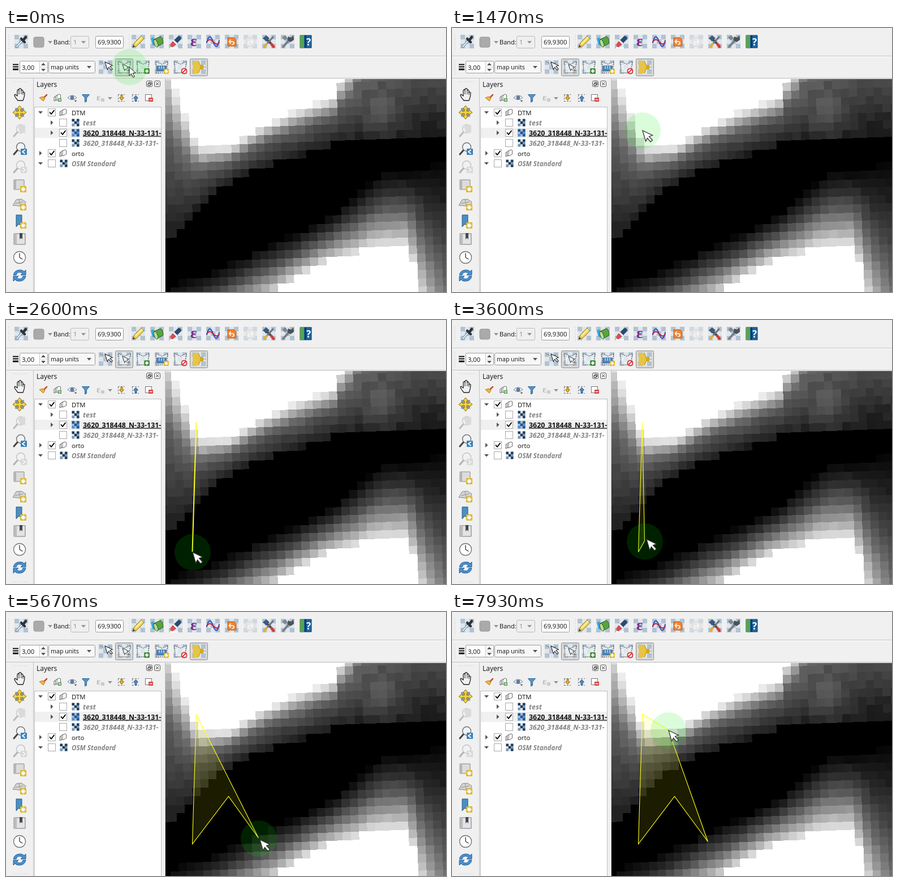
Animation, 778 px wide and 466 px high, one loop 8000 ms. Source, as an HTML page with a canvas:

```html
<!DOCTYPE html>
<html lang="en">
<head>
<meta charset="utf-8">
<title>Polygon selection on a raster layer</title>
<style>
  html, body { margin: 0; width: 100%; height: 100%; overflow: hidden; background: #f0f0f0; }
  canvas { position: absolute; left: 282px; top: 90px; }
  svg { position: absolute; left: 0; top: 0; }
  text { font: 11.3px "Open Sans", sans-serif; fill: #111; white-space: pre; }
  .layer { font: italic 700 12.4px "Open Sans", sans-serif; fill: #858585; }
  .field { fill: #fff; stroke: #9b9b9b; }
  .btn { fill: #d9d9d9; stroke: #8c8c8c; }
  .ln { fill: none; stroke-linecap: round; stroke-linejoin: round; }
</style>
</head>
<body>
<canvas id="map" width="496" height="376"></canvas>
<svg width="778" height="466" viewBox="0 0 778 466">
  <defs>
    <g id="chk">
      <rect x="-12" y="-12" width="24" height="24" fill="#dfe6ed"/>
      <path fill="#b1c2d2" d="M-12-12h8v8h-8zM4-12h8v8h-8zM-4-4h8v8h-8zM-12 4h8v8h-8zM4 4h8v8h-8z"/>
    </g>
    <g id="ras">
      <rect x="-6.5" y="-6.5" width="13" height="13" fill="#d5dfe8"/>
      <path fill="#1f3a57" d="M-6.500-6.500h4.400v4.400h-4.400zM2.100-6.500h4.400v4.400h-4.400zM-2.200-2.200h4.400v4.400h-4.400zM2.100 2.100h4.400v4.400h-4.400z"/>
      <path fill="#7795b2" d="M-6.500 2.100h4.400v4.400h-4.400zM2.100-2.200h4.400v4.400h-4.400z"/>
    </g>
    <g id="stack" fill="#fff" stroke="#666">
      <path d="M-6-1l4-2v7l-4 2z"/><path d="M-3.500-3l4-2v8l-4 2z"/><path d="M-1-4l4-2 2.500 1v7l-6.500 3z"/>
    </g>
    <g id="box"><rect x="-6.5" y="-6.5" width="13" height="13" fill="#fff" stroke="#a9a9a9"/></g>
    <g id="tick"><use href="#box"/><path class="ln" d="M-3.500 0L-1 3 4-3.500" stroke="#000" stroke-width="1.900"/></g>
    <path id="down" d="M-4-2h8l-4 4.500z" fill="#555"/>
    <path id="right" d="M-2-4v8l4.500-4z" fill="#555"/>
    <path id="poly" d="M-10-10L1-5 11-10 8 10H-9z" fill="#eef1f4" fill-opacity=".75" stroke="#333" stroke-dasharray="2 1.500"/>
    <path id="arrow" d="M0 0v15l3.500-3.500 3 6.500 2.800-1.200-3-6.300h5z" fill="#fff" stroke="#111"/>
    <g id="star"><rect x="-5" y="-5" width="11" height="11" rx="1.500" fill="#d9b526"/>
      <path d="M.5-4v9M-4 .5h9M-2.500-2.500l6 6M3.500-2.500l-6 6" stroke="#fff" stroke-width="1.300"/></g>
    <g id="lens"><circle cx="2" cy="-3" r="7.500" fill="#eef3f7" stroke="#777" stroke-width="1.500"/>
      <path class="ln" d="M-4 3l-6 7" stroke="#444" stroke-width="3"/></g>
    <path id="grip" d="M1 0v26" stroke="#b5b5b5" stroke-dasharray="1 3"/>
    <clipPath id="tree"><rect x="51" y="140" width="223" height="326"/></clipPath>
    <clipPath id="view"><rect x="282" y="90" width="496" height="376"/></clipPath>
  </defs>

  <!-- frame lines -->
  <path fill="none" stroke="#c3c3c3" d="M0 49.500H778M0 88.500H778M48.500 89V466M281.500 89V466"/>
  <path fill="none" stroke="#fff" d="M0 50.500H778"/>
  <use href="#grip" x="4" y="12"/><use href="#grip" x="217" y="12"/><use href="#grip" x="4" y="57"/>
  <use href="#grip" transform="translate(38 94) rotate(90)"/><use href="#grip" transform="translate(38 461) rotate(90)"/>

  <!-- raster toolbar -->
  <g transform="translate(27 24)"><use href="#chk"/>
    <path class="ln" d="M-8 9L2-2" stroke="#5f7f99" stroke-width="4"/><path class="ln" d="M-8 9L2-2" stroke="#e8f4fb" stroke-width="2"/>
    <path class="ln" d="M0-5L6 1M4-3L8-8" stroke="#2d3339" stroke-width="4.500"/></g>
  <rect x="49" y="16" width="18" height="18" rx="3" fill="#aaa" stroke="#989898"/>
  <use href="#down" x="78" y="25" opacity=".6"/>
  <text x="84" y="29" style="font-size:11px">Band:</text>
  <rect x="114.500" y="14.500" width="32" height="21" rx="2" fill="#efefef" stroke="#bbb"/>
  <text x="119" y="29" style="fill:#888">1</text><use href="#down" x="137" y="25" opacity=".6"/>
  <rect class="field" x="158.500" y="14.500" width="49" height="21" rx="2"/><text x="162" y="29">69,9300</text>
  <g transform="translate(234 24)"><use href="#chk"/>
    <path d="M-10 10l3-8L5-10l5 5L-3 8z" fill="#f4d44c" stroke="#8f7420"/><path d="M-10 10l1.500-4 2.500 2.500z" fill="#333"/><path d="M-5 4L7-8" stroke="#fff3a8" stroke-width="2"/></g>
  <g transform="translate(267 24)"><use href="#chk"/>
    <path d="M-11-5l5-3 3 15-5-1z" fill="#38a4d8"/><path d="M-5-4l11-5q5 2 5 12L0 9z" fill="#5aa33c" stroke="#24571c"/>
    <ellipse cx="-3" cy="2" rx="3" ry="7" transform="rotate(-22)" fill="#b8dc9b" stroke="#24571c"/></g>
  <g transform="translate(300 24)"><use href="#chk"/>
    <path class="ln" d="M-4 4L6-6" stroke="#2b4a73" stroke-width="7.500"/><path class="ln" d="M-6 6l2-2" stroke="#e5484a" stroke-width="7"/>
    <path d="M-4-2l6 6" stroke="#fff" stroke-width="3"/><path d="M-10 11H4" stroke="#fff" stroke-width="2"/></g>
  <g transform="translate(333 24)"><use href="#chk"/>
    <text x="-7" y="8" style="font:bold 27px 'Liberation Serif',serif;fill:#7b2a86">ε</text></g>
  <g transform="translate(366 24)"><use href="#chk"/>
    <path class="ln" d="M-11 2C-8-12-4-11 0 0S8 12 11-2" stroke="#2a45c8" stroke-width="2"/><path class="ln" d="M-11 0C-6-5-4-4 0 0S6 6 11 2" stroke="#d51f26" stroke-width="2"/></g>
  <g transform="translate(399 24)"><use href="#chk"/>
    <path d="M-7-7H4l4 4V8H-7z" fill="#ee8434" stroke="#b8591b"/><path class="ln" d="M-4 0h5q3 0 3 2.500T1 5M-2-3l-2.500 3L-2 3" stroke="#fff" stroke-width="1.700"/></g>
  <g transform="translate(432 24)" opacity=".5"><use href="#chk"/>
    <path d="M-7-7H4l4 4V8H-7z" fill="#ddd" stroke="#bbb"/><path class="ln" d="M4 0h-5q-3 0-3 2.500T-1 5M2-3l2.500 3L2 3" stroke="#fff" stroke-width="1.700"/></g>
  <g transform="translate(465 24)"><use href="#chk"/>
    <path class="ln" d="M-6-6L3 3" stroke="#353c43" stroke-width="3.500"/><path class="ln" d="M4 4l4 5" stroke="#d53a32" stroke-width="4.500"/><path d="M-11-6l6-5 6 5-6 6z" fill="#3b5a80"/>
    <path class="ln" d="M7-8L-3 3" stroke="#6c757d" stroke-width="3"/><path class="ln" d="M-4 4l-4 5" stroke="#e0b02e" stroke-width="4"/></g>
  <g transform="translate(498 24)"><use href="#chk"/>
    <path class="ln" d="M-8 9L4-4" stroke="#777f87" stroke-width="4"/><path d="M1-9l5 2 4-4 1 8-6 4-6-4z" fill="#4b535a"/>
    <path d="M-10-8l6-3 4 5-5 4z" fill="#7d878f"/></g>
  <g transform="translate(531 24)">
    <path d="M-11-11H9v22h-20z" fill="#1b66a3" stroke="#173d5f"/><path d="M-11-11h7v22h-7z" fill="#55a452"/><path d="M-3-11h3v22h-3z" fill="#123a5c"/>
    <text x="0" y="7" style="font:bold 17px 'Open Sans',sans-serif;fill:#fff">?</text></g>

  <!-- selection toolbar -->
  <path d="M12 64.500h10M12 68.500h10" stroke="#111" stroke-width="2"/><path d="M12 73h10" stroke="#111" stroke-width="3"/>
  <rect class="field" x="24.500" y="58.500" width="49" height="21" rx="2"/><path d="M59.500 59v20M60 69h13" stroke="#c8c8c8"/>
  <use href="#down" x="66" y="74"/><use href="#down" transform="translate(66 64) scale(1 -1)"/><text x="28" y="73.500">3,00</text>
  <rect x="75.500" y="58.500" width="82" height="21" rx="2" fill="#f7f7f7" stroke="#9b9b9b"/><text x="79" y="73" style="font-size:10.700px">map units</text><use href="#down" x="147" y="69"/>
  <g transform="translate(176 69)"><use href="#chk"/><path class="ln" d="M-9-9L2-4 9-9" stroke="#444" stroke-dasharray="1 2.500"/><use href="#arrow" transform="translate(-1 -9) rotate(-18) scale(.95)"/></g>
  <rect class="btn" x="193.500" y="54.500" width="31" height="30" rx="2"/>
  <g transform="translate(209 69)"><use href="#chk"/><use href="#poly"/><use href="#arrow" transform="translate(-3 -5) rotate(-18) scale(.8)"/></g>
  <g transform="translate(242 69)"><use href="#chk"/><use href="#poly"/><rect x="2" y="2" width="10" height="10" rx="2" fill="#4d9448"/><path d="M7 4v6M4 7h6" stroke="#fff" stroke-width="2"/></g>
  <g transform="translate(275 69)"><use href="#chk"/><use href="#poly"/><rect x="-8" y="-2" width="16" height="9" fill="#4c88c1" stroke="#275987"/><path d="M-4-2v5M0-2v5M4-2v5" stroke="#fff"/><use href="#star" transform="translate(8 7) scale(.8)"/></g>
  <g transform="translate(308 69)"><use href="#chk"/><use href="#poly"/><circle cx="7" cy="7" r="4.500" fill="#fff" stroke="#d8393b" stroke-width="2"/><path d="M4 10l6-6" stroke="#d8393b" stroke-width="2"/></g>
  <rect class="btn" x="325.500" y="54.500" width="31" height="30" rx="2"/>
  <g transform="translate(341 69)"><use href="#chk"/><path d="M-11-11H-1L4 0-1 11h-10z" fill="#e7c444"/><path class="ln" d="M-1-11L4 0-1 11M4 0h8" stroke="#9d7b16" stroke-dasharray="2 1.500"/><path d="M2-4h6v8h-6z" fill="#d5a91d"/></g>

  <!-- map navigation -->
  <g transform="translate(24 117)"><path class="ln" d="M-3 11C-9 4-10 1-8 0l4 3V-7q2-3 3 0v-2q2-3 4 0v2q2-2 3 1v3q3-2 3 1C9 4 8 6 6 11z" fill="#fff" stroke="#222" stroke-width="1.300"/><path d="M-1-7v7M3-7v7M6-4v5" stroke="#222"/></g>
  <g transform="translate(24 149)"><path d="M-8-8H8V8H-8z" fill="#88a8c8"/><path d="M0-12l5 6H2v4h4v-3l6 5-6 5V2H2v4h3l-5 6-5-6h3V2h-4v3l-6-5 6-5v3h4v-4h-3z" fill="#f5d13d" stroke="#8a6c12"/></g>
  <g transform="translate(24 181)" opacity=".3"><use href="#lens"/><path d="M-4-10h14v14h-9z" fill="#aaa"/></g>
  <g transform="translate(24 213)"><use href="#lens"/><rect x="2" y="0" width="11" height="11" rx="1" fill="#3d83bc"/><path class="ln" d="M9 2.500L5 5.500l4 3" stroke="#fff" stroke-width="2"/></g>
  <g transform="translate(24 245)" opacity=".35"><use href="#lens"/><rect x="2" y="0" width="11" height="11" rx="1" fill="#aaa"/><path class="ln" d="M6 2.500l4 3-4 3" stroke="#fff" stroke-width="2"/></g>
  <g transform="translate(24 277)"><path d="M-10-9H8V8h-18z" fill="#dcdcdc" stroke="#888"/><path d="M-10-9h4V8h-4z" fill="#b5b5b5"/><use href="#star" x="6" y="7"/></g>
  <g transform="translate(24 309)"><path d="M-12 4l6-10L3-7l8 5-3 9-10-2z" fill="#d3d3d3" stroke="#8b8b8b"/><path d="M-8 1l14-3M-1-6l2 10" stroke="#9a9a9a"/><use href="#star" x="6" y="7"/></g>
  <g transform="translate(24 341)"><path d="M-6-11H4V10l-5-5-5 5z" fill="#4a8fc5" stroke="#275987"/><use href="#star" x="6" y="7"/></g>
  <g transform="translate(24 372)"><path d="M-10-9H10V10h-20z" fill="#e3e3e3" stroke="#777"/><path d="M-10-9h5V10h-5z" fill="#bbb"/><path d="M0-10h5v11l-2.500-2.500L0 1z" fill="#3c4a58"/></g>
  <g transform="translate(24 405)"><circle r="10.500" fill="#fff" stroke="#777" stroke-width="1.300"/><path class="ln" d="M0-7V0l5 3" stroke="#333" stroke-width="1.300"/></g>
  <g transform="translate(24 437)"><path id="half" d="M-11-1Q-9-10 1-10q5 0 7 3l3-3v9H2l3-3q-2-2-5-2-5 0-6 5z" fill="#4b8fce" stroke="#255f98"/><use href="#half" transform="rotate(180)"/></g>

  <!-- layers panel -->
  <text x="54" y="103.500" style="font-size:12px">Layers</text>
  <g fill="#f6f6f6" stroke="#555"><rect x="248.500" y="93.500" width="10" height="10" rx="2"/><rect x="262.500" y="93.500" width="10" height="10" rx="2"/>
    <path fill="none" d="M251 98h4v3.500h-4zM252.500 98v-2h4v4h-1.500M265 96l5 5M270 96l-5 5" stroke="#222"/></g>
  <g transform="translate(66 123)"><path class="ln" d="M6-5L1 0" stroke="#c64b38" stroke-width="2.500"/><path d="M-7 0l6-2 4 3-3 5z" fill="#eeb83a" stroke="#b97d1a"/></g>
  <g transform="translate(91 123)"><use href="#stack"/><rect x="1" y="1" width="6" height="6" fill="#57a052"/><path d="M4 2v4M2 4h4" stroke="#fff"/></g>
  <g transform="translate(117 123)"><path d="M-8 0Q0-8 8 0 0 7-8 0z" fill="#fff" stroke="#777"/><circle r="3.500" fill="#567fa8"/><use href="#down" transform="translate(6 6) scale(.6)"/></g>
  <path d="M134.500 117.500h13l-5 6v6l-3 1.500v-7.500z" fill="#5594cb" stroke="#2c6498"/>
  <text x="160" y="128" style="font:bold 17px 'Liberation Serif',serif;fill:#bbb">ε</text><rect x="168" y="124" width="6" height="6" fill="#ccc"/><use href="#down" x="184" y="124" opacity=".6"/>
  <path d="M198 117.500h12M198 129.500h12M198.500 118v11" fill="none" stroke="#777" stroke-dasharray="3 2"/><path d="M203 118v5h-2.500l4 5 4-5H206v-5z" fill="#e8ad2c" stroke="#9a6d11"/>
  <path d="M223 117.500h12M223 129.500h12M223.500 118v11" fill="none" stroke="#777" stroke-dasharray="3 2"/><path d="M228 129v-5h-2.500l4-5 4 5H231v5z" fill="#4d8cc5" stroke="#295f92"/>
  <rect x="246.500" y="117.500" width="11" height="11" fill="#fff" stroke="#777"/><rect x="252" y="123" width="8" height="7" fill="#d64545"/><path d="M253.500 126.500h5" stroke="#fff" stroke-width="1.500"/>

  <rect x="50.500" y="139.500" width="224" height="330" fill="#fff" stroke="#bdbdbd"/>
  <g clip-path="url(#tree)">
    <rect x="51" y="176" width="224" height="18" fill="#f0f0f0"/>
    <use href="#down" x="61" y="149"/><use href="#tick" x="81" y="149"/><use href="#stack" x="101" y="149"/><text x="116" y="153.500">DTM</text>
    <use href="#right" x="81" y="167"/><use href="#box" x="101" y="167"/><use href="#ras" x="123" y="167"/><text class="layer" x="136" y="171.500">test</text>
    <use href="#right" x="81" y="185"/><use href="#tick" x="101" y="185"/><use href="#ras" x="123" y="185"/><rect x="116" y="178" width="14" height="14" fill="#2c7be0" opacity=".35"/>
    <text x="136" y="189.500" style="font-size:12.400px;font-weight:700;text-decoration:underline">3620_318448_N-33-131-</text>
    <use href="#box" x="101" y="203"/><use href="#ras" x="123" y="203"/><text class="layer" x="136" y="207.500">3620_318448_N-33-131-</text>
    <use href="#right" x="61" y="221"/><use href="#tick" x="81" y="221"/><use href="#stack" x="101" y="221"/><text x="116" y="226">orto</text>
    <use href="#down" x="61" y="239"/><use href="#box" x="81" y="239"/><use href="#ras" x="102" y="239"/><text class="layer" x="116" y="244" style="font-size:11.600px">OSM Standard</text>
  </g>

  <!-- moving parts -->
  <polygon id="band" clip-path="url(#view)" fill="#ff0" fill-opacity=".11" stroke="#ffff1e" stroke-width="1.100"/>
  <circle id="halo" r="32" fill="#00e600" fill-opacity=".14"/>
  <g id="mouse">
    <rect x=".5" y=".5" width="22" height="31" rx="10.500" fill="#f2f2f2" stroke="#555"/>
    <path d="M11 1v12H1v-3q1-8 10-9z" fill="#e0443e"/><path d="M1 13.500h21M11.500 1v12" stroke="#555"/>
  </g>
  <use id="plain" href="#arrow"/>
  <path id="pick" d="M0 0L17.500 8.500 11.500 10.500 17.500 17 14 20 8.500 13.500 5.500 19z" fill="#fff" stroke="#333" stroke-width="1.300"/>
</svg>
<script>
const $ = id => document.getElementById(id);

// Piecewise linear lookup: pts are [key, value, value...]
function at(pts, key, col = 1) {
  if (key <= pts[0][0]) return pts[0][col];
  for (let i = 1; i < pts.length; i++) {
    const a = pts[i - 1], b = pts[i];
    if (key <= b[0]) return a[col] + (b[col] - a[col]) * (key - a[0]) / (b[0] - a[0]);
  }
  return pts[pts.length - 1][col];
}

// Terrain: contour heights by x, and the shade across each slope
const whiteEnd = [[282,55],[293,92],[340,210],[397,209],[443,179],[500,152],[570,125],[583,120],[585,95],[600,85],[614,55],[632,5],[778,-60]];
const blackTop = [[282,378],[312,358],[345,312],[386,281],[443,252],[500,232],[575,206],[640,197],[778,185]];
const blackEnd = [[282,468],[312,449],[385,424],[457,387],[515,362],[575,332],[640,278],[668,252],[700,254],[778,240]];
const whiteTop = [[282,600],[400,500],[472,466],[507,443],[556,415],[613,397],[655,381],[708,379],[726,426],[735,466],[765,560],[778,600]];
const upper = [[0,240],[.08,216],[.23,158],[.37,106],[.55,77],[.75,56],[1,28]];
const lower = [[0,8],[.2,34],[.5,86],[.75,148],[1,220]];

const noise = (i, j) => {
  const s = Math.sin(i * 127.1 + j * 311.7) * 43758.5453;
  return s - Math.floor(s) - .5;
};

function shade(x, y, n) {
  const w = at(whiteEnd, x), b = at(blackTop, x), e = at(blackEnd, x), s = at(whiteTop, x);
  if (y < w || y > s) return 255;
  if (y < b) {
    const mound = 36 * Math.exp(-((x - 665) ** 2 + (y - 152) ** 2) / 1300);
    return at(upper, (y - w) / (b - w)) + mound + n * (x > 600 ? 17 : 9);
  }
  if (y < e) return 0;
  return at(lower, (y - e) / (s - e)) + n * 8;
}

function drawMap() {
  const ctx = $('map').getContext('2d'), img = ctx.createImageData(496, 376);
  const size = 14.6, tilt = 2.1 * Math.PI / 180, c = Math.cos(tilt), s = Math.sin(tilt);
  const ox = 340, oy = 208, cells = {};
  for (let y = 0; y < 376; y++) for (let x = 0; x < 496; x++) {
    const dx = x + 282.5 - ox, dy = y + 90.5 - oy;
    const i = Math.floor((dx * c - dy * s) / size), j = Math.floor((dx * s + dy * c) / size);
    const key = i + ',' + j;
    if (!(key in cells)) {
      const u = (i + .5) * size, v = (j + .5) * size;
      cells[key] = shade(ox + u * c + v * s, oy - u * s + v * c, noise(i, j));
    }
    const g = cells[key], p = (y * 496 + x) * 4;
    img.data[p] = img.data[p + 1] = img.data[p + 2] = g;
    img.data[p + 3] = 255;
  }
  ctx.putImageData(img, 0, 0);
}

// Pointer path in ticks of 1/15 s
const path = [[1,218,69],[2,222,74],[3,240,96],[4,271,137],[5,302,175],[6,320,195],[7,328,187],[8,334,183],[9,337,181],
  [24,337,181],[25,337,189],[27,336.5,235],[29,336,301],[31,333,350],[33,331,382],[35,330,399],[37,330,407],[39,330,410],
  [53,330,410],[54,341,391],[56,362,365],[59,384,338],[62,394,326],
  [77,394,326],[78,397,330],[80,410,349],[83,436,386],[86,453,407],
  [108,453,407],[109,450,392],[111,425,318],[113,394,232],[115,378,189],[117,378,189],[118,381,200],[119,383,209]];
// Clicks: button shown, button released, vertex placed
const clicks = [[13,22,336,180],[42,49,329,409],[64,74,393,325],[99,108,452,405]];

const pos = k => [Math.round(at(path, k, 1)), Math.round(at(path, k, 2))];
const move = (el, x, y) => el.setAttribute('transform', `translate(${x} ${y})`);
const show = (el, on) => el.style.display = on ? '' : 'none';

function frame(now) {
  const k = Math.floor((now % 8000 + 7) * 15 / 1000);
  const [x, y] = pos(k), [tx, ty] = pos(k + .3);
  const onMap = tx > 282 && ty > 89;
  move($('halo'), x, y);
  move($('plain'), tx, ty);
  move($('pick'), tx, ty);
  show($('plain'), !onMap);
  show($('pick'), onMap);

  const held = clicks.find(c => k >= c[0] && k < c[1]);
  show($('mouse'), held);
  if (held) move($('mouse'), x + 77, y - 12);

  const placed = clicks.filter(c => k >= c[1]).map(c => [c[2] + .5, c[3] + .5]);
  show($('band'), placed.length);
  $('band').setAttribute('points', [...placed, [x - .5, y - 1]].join(' '));
  $('band').setAttribute('stroke-width', placed.length === 1 ? 2 : 1.1);
  requestAnimationFrame(frame);
}

drawMap();
requestAnimationFrame(frame);
</script>
</body>
</html>
```
